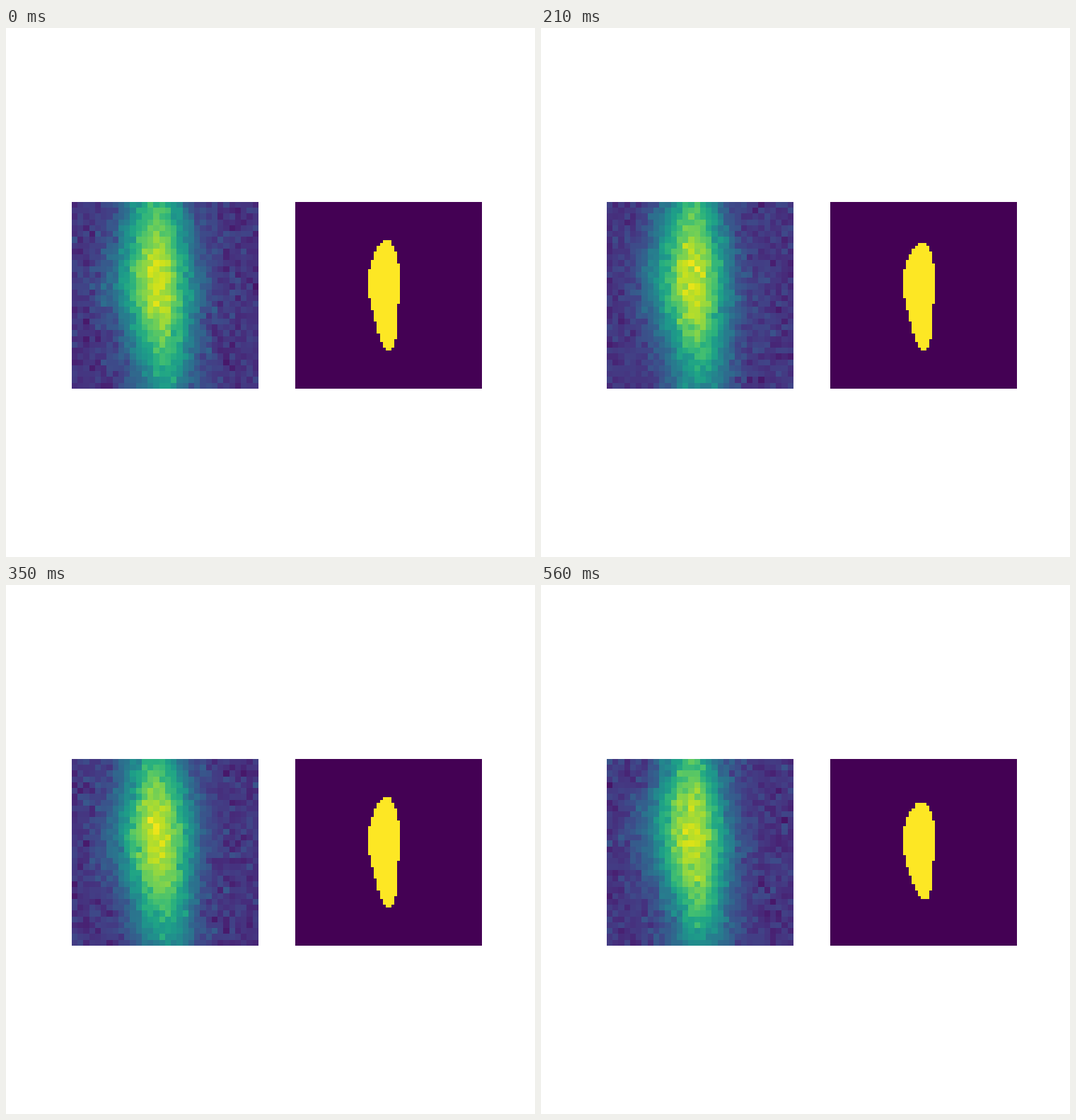
A matplotlib script that plays this animation: 748x748 px, repeating every 630 ms.

```python
import matplotlib.pyplot as plt
import numpy as np
from matplotlib.animation import FuncAnimation

STAGE, SIDE = 748, 264
FRAMES, INTERVAL = 9, 70
N, M = 32, 64  # cells per side: noisy spot, mask

# Upper and lower tip of the mask over time
TOPS = [13, 14, 15, 14, 14, 13, 12, 14, 15]
LOWS = [51, 48, 50, 51, 52, 51, 51, 50, 48]


def spot(i):
    rng = np.random.default_rng(100 + i)
    row, col = np.mgrid[:N, :N]
    bulge = np.exp(-((row - 13) / 8) ** 2)
    height = 0.77 * np.exp(-0.5 * ((row - 13) / 14.5) ** 2)
    mid = 14.2 + 0.07 * np.maximum(row - 11, 0)
    spread = np.where(col < mid, 3.9 + 1.1 * bulge, 3.6 + 0.7 * bulge)
    light = height * np.exp(-0.5 * ((col - mid) / spread) ** 2)
    noise = rng.normal(0, 0.038, (N, N))
    return np.clip(0.15 + light + noise, 0, 1)


def mask(i):
    """Fill a drop shape: each side curves from a fixed flank to the tips."""
    top, low = TOPS[i], LOWS[i]
    row, col = np.mgrid[:M, :M]
    u = np.where(col < 31, (31 - col) / 6, (col - 31) / 4)
    left = col < 31
    upper = top + u ** 2 * (np.where(left, 23.5, 21) - top)
    lower = low - u ** np.where(left, 1.5, 5) * (low - np.where(left, 33, 35))
    return (u <= 1) & (row >= np.floor(upper)) & (row < np.round(lower))


fig = plt.figure(figsize=(STAGE / 100, STAGE / 100), dpi=100)
views = []
for x, make in ((93, spot), (409, mask)):
    ax = fig.add_axes([x / STAGE, 238 / STAGE, SIDE / STAGE, SIDE / STAGE])
    ax.axis("off")
    views.append(ax.imshow(make(0), cmap="viridis", vmin=0, vmax=1,
                           interpolation="nearest"))


def update(i):
    for view, make in zip(views, (spot, mask)):
        view.set_data(make(i))
    return views


anim = FuncAnimation(fig, update, frames=FRAMES, interval=INTERVAL,
                     repeat=True, repeat_delay=0)
plt.show()
```
